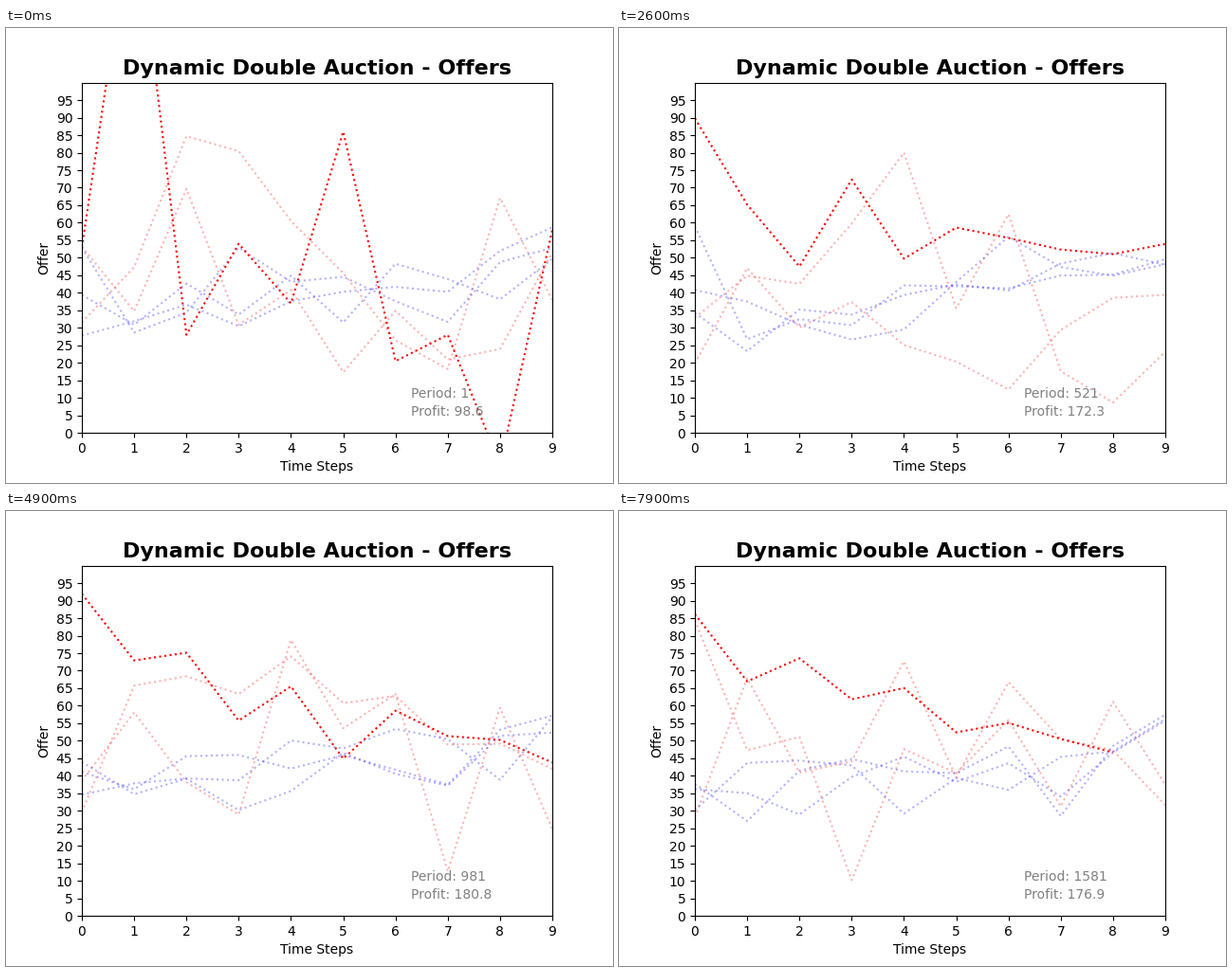
These frames come from a looping animation (640 by 480 pixels, 8 s). A matplotlib script:

```python
import numpy as np
import matplotlib.pyplot as plt
from matplotlib.animation import FuncAnimation

FRAMES, INTERVAL = 80, 100
PERIODS_PER_FRAME = 20
STEPS = np.arange(10)

# The learner moves from wild first offers to a settled, falling curve.
FIRST = np.array([53, 153, 28, 54, 37, 86, 20.5, 28, -9, 58])
SETTLED = np.array([85, 66, 72, 63, 62, 53, 53, 49, 49, 51])

# Profit climbs fast, then drifts between a few levels.
PROFIT_PERIODS = [1, 301, 521, 761, 981, 1361, 1581]
PROFITS = [98.6, 181.5, 172.3, 168.1, 180.8, 191.3, 176.9]

plt.rcParams["font.family"] = "DejaVu Sans"


def learner_offers(rng, period):
    """Offers forget the first try and grow steadier, late steps most."""
    age = period - 1
    memory = np.exp(-age / 90)
    spread = 14 * (1 - memory) * np.exp(-age / 900) * np.linspace(1.6, 0.5, 10)
    offers = SETTLED + memory * (FIRST - SETTLED) + rng.normal(0, spread)
    early_deal = rng.random() < 0.3 * (1 - memory)
    return offers[:rng.integers(8, 10)] if early_deal else offers


def seller_offers(rng):
    """Asks jump about below a ceiling that sinks with time."""
    return rng.uniform(8, np.linspace(92, 66, 10))


def buyer_offers(rng):
    """Bids stay near 37 and rise towards the close."""
    return 37 + 15 * (STEPS / 9) ** 3 + rng.normal(0, 7.5, 10)


def auction(period):
    rng = np.random.default_rng(period)
    return [learner_offers(rng, period),
            *(seller_offers(rng) for _ in range(2)),
            *(buyer_offers(rng) for _ in range(3))]


fig, ax = plt.subplots(figsize=(6.4, 4.8), dpi=100)
ax.set(xlim=(0, 9), ylim=(0, 100), xticks=STEPS, yticks=range(0, 100, 5),
       xlabel="Time Steps", ylabel="Offer")
ax.set_title("Dynamic Double Auction - Offers", fontsize=16, fontweight="bold")


def dotted(color, alpha=0.3, z=2):
    return ax.plot([], [], ":", color=color, alpha=alpha, lw=1.5, zorder=z)[0]


lines = [dotted("red", 1, 2.5)]
lines += [dotted(c) for c in ["red"] * 2 + ["blue"] * 3]
period_text = ax.text(6.3, 10, "", color="gray")
profit_text = ax.text(6.3, 5, "", color="gray")


def update(i):
    period = 1 + PERIODS_PER_FRAME * i
    for line, offers in zip(lines, auction(period)):
        line.set_data(STEPS[:len(offers)], offers)
    profit = np.interp(period, PROFIT_PERIODS, PROFITS)
    period_text.set_text(f"Period: {period}")
    profit_text.set_text(f"Profit: {profit:.1f}")
    return [*lines, period_text, profit_text]


anim = FuncAnimation(fig, update, frames=FRAMES, interval=INTERVAL,
                     repeat=True, repeat_delay=0)
plt.show()
```
